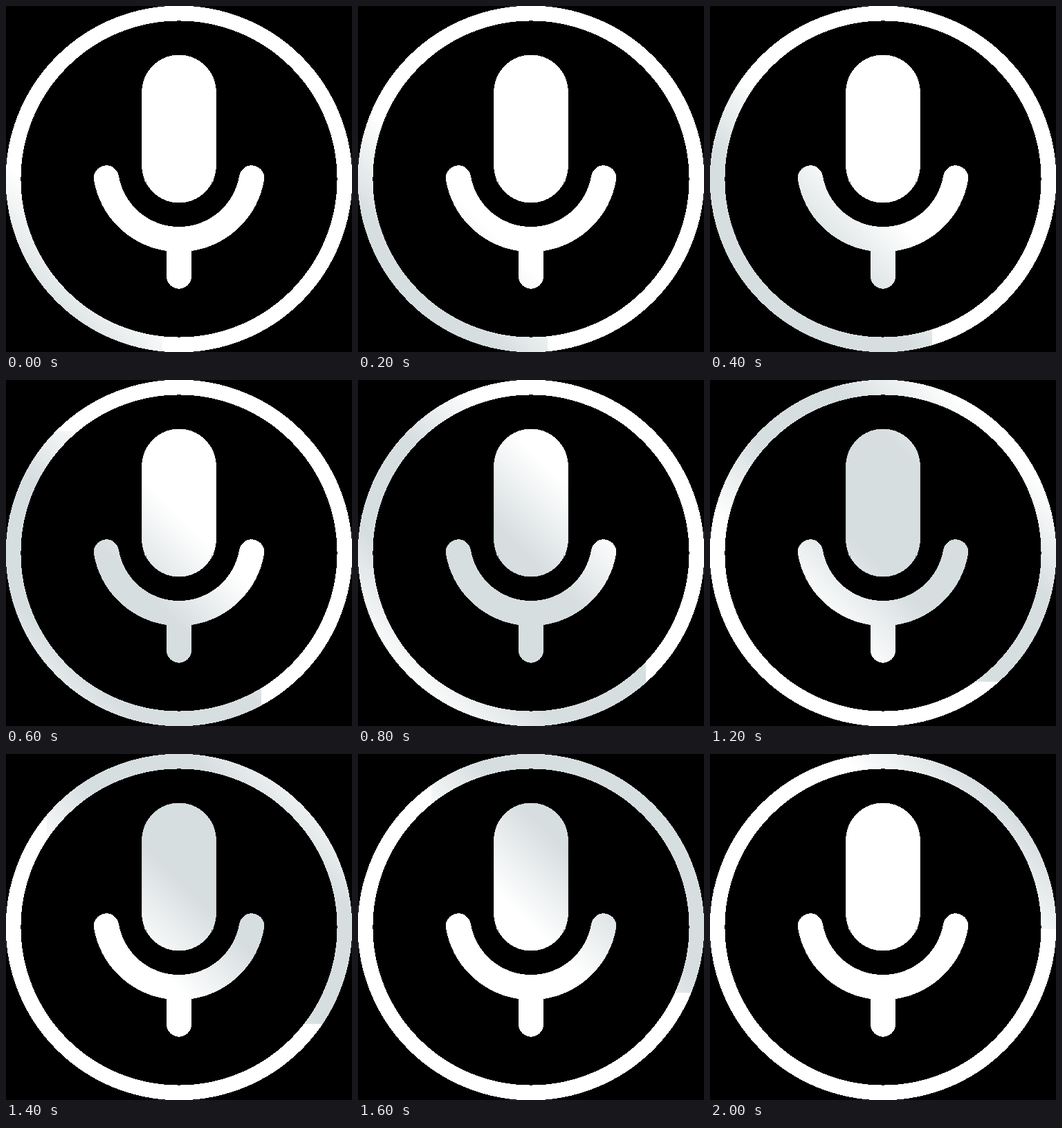
An HTML page that plays this animation: 500x500 px, repeating every 2.2 s.

```html
<!DOCTYPE html>
<html lang="en">
<head>
<meta charset="utf-8">
<title>Microphone shimmer</title>
<style>
  html, body { margin: 0; width: 100%; height: 100%; overflow: hidden; background: #000; }
  svg { display: block; width: 100%; height: 100%; isolation: isolate; }
  #band { mix-blend-mode: multiply; }
</style>
</head>
<body>
<svg viewBox="0 0 500 500" shape-rendering="crispEdges">
  <defs>
    <linearGradient id="sheen" x1="0" y1="1" x2="1" y2="0">
      <stop offset=".24" stop-color="#fff"/>
      <stop offset=".4" stop-color="#d7dee0"/>
      <stop offset=".6" stop-color="#d7dee0"/>
      <stop offset=".76" stop-color="#fff"/>
    </linearGradient>
  </defs>
  <rect width="500" height="500"/>
  <circle cx="250" cy="250" r="239.5" fill="none" stroke="#fff" stroke-width="21.9"/>
  <!-- The hairline stroke fills partly covered edge pixels. -->
  <path transform="translate(37 35.5) scale(17.75)" fill="#fff" stroke="#fff" stroke-width=".05"
    d="M12 14c1.66 0 3-1.34 3-3V5c0-1.66-1.34-3-3-3S9 3.34 9 5v6c0 1.66 1.34 3 3 3z
       M17.91 11c-.49 0-.9.36-.98.85C16.52 14.2 14.47 16 12 16s-4.52-1.8-4.93-4.15c-.08-.49-.49-.85-.98-.85
       -.61 0-1.09.54-1 1.14.49 3 2.89 5.35 5.91 5.78V20c0 .55.45 1 1 1s1-.45 1-1v-2.08
       c3.02-.43 5.42-2.78 5.91-5.78.1-.6-.39-1.14-1-1.14z"/>
  <rect id="band" width="500" height="500" fill="url(#sheen)"/>
</svg>
<script>
  const LOOP = 2200, STEP = 100, LAST_STEP = 20;
  const band = document.getElementById('band');
  const start = performance.now();

  // The shaded square travels up and to the right in discrete steps.
  function draw(time) {
    const step = Math.min(Math.floor(time / STEP), LAST_STEP);
    band.setAttribute('x', -274 + 23.75 * step);
    band.setAttribute('y', 211 - 22.9 * step);
  }

  function tick(now) {
    draw(Math.max(0, now - start) % LOOP);
    requestAnimationFrame(tick);
  }

  draw(0);
  requestAnimationFrame(tick);
</script>
</body>
</html>
```
